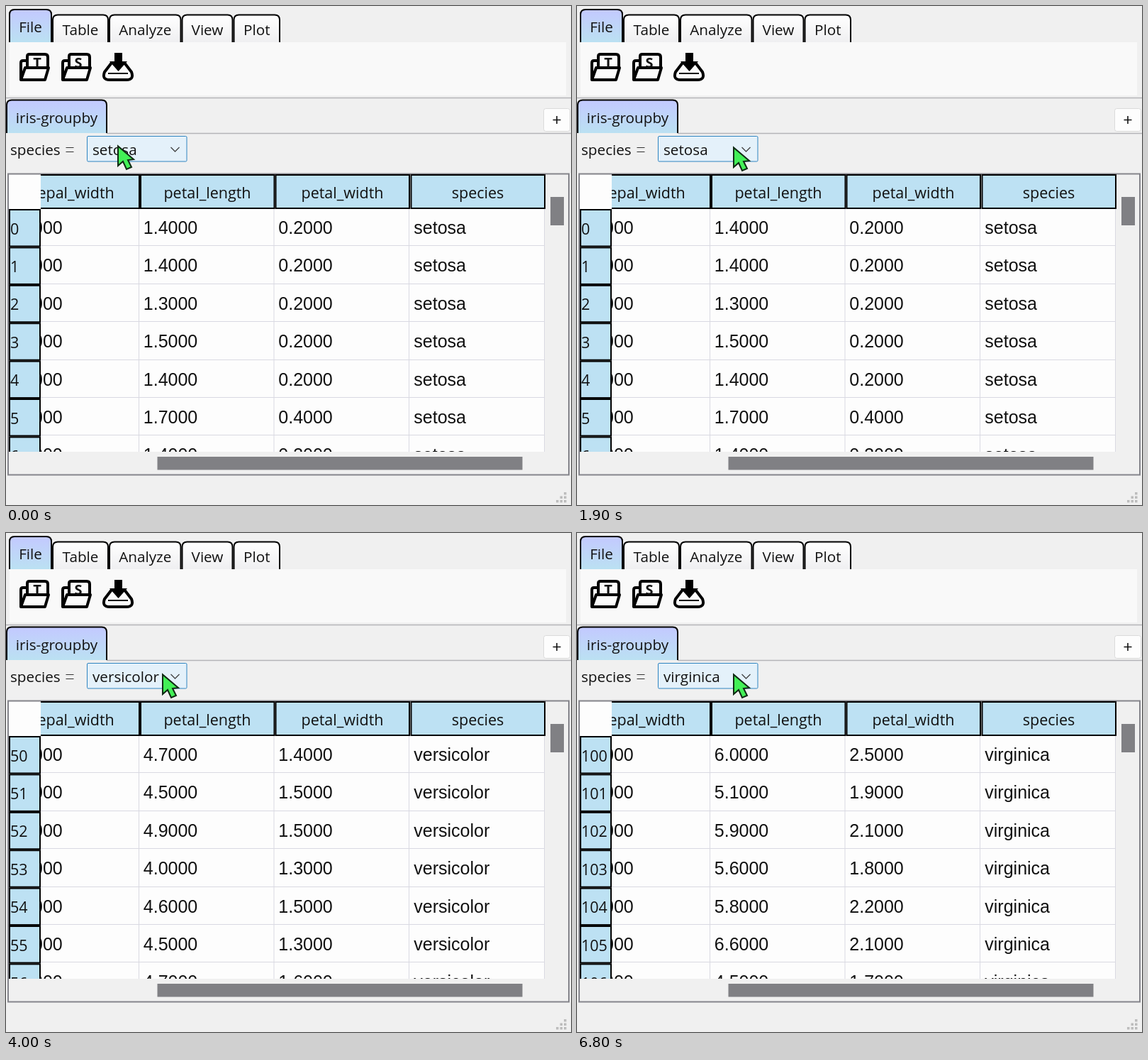
An HTML page that plays this animation: 797x703 px, repeating every 6.9 s.

```html
<!DOCTYPE html>
<html lang="en">
<head>
<meta charset="utf-8">
<title>Group by species</title>
<style>
html, body { margin: 0; width: 100%; height: 100%; overflow: hidden; background: #f0f0f0; }
svg { display: block; }
text { white-space: pre; fill: #111; }
.ui { font: 20.7px "Open Sans", "Noto Sans", sans-serif; }
.head { font-size: 21.5px; }
.cell { font: 25px "Liberation Sans", Arial, sans-serif; }
.mid { text-anchor: middle; }
.tab { stroke: #000; stroke-width: 2; }
.box { fill: #bde1f3; stroke: #000; stroke-width: 2; }
.grid { stroke: #d9d9e2; fill: none; }
.icon { fill: #fcfcfc; stroke: #000; stroke-width: 4; stroke-linejoin: round; stroke-linecap: round; }
#combo { fill: #fdfdfd; stroke: #d2d2d2; }
#combo.hover { fill: #e4f1fa; stroke: #2f84c0; }
</style>
</head>
<body>
<svg class="ui" width="797" height="703" viewBox="0 0 797 703">
  <defs>
    <linearGradient id="active" x2="0" y2="1">
      <stop stop-color="#c3c9ff"/><stop offset="1" stop-color="#bbe1f2"/>
    </linearGradient>
    <linearGradient id="idle" x2="0" y2="1">
      <stop stop-color="#fff"/><stop offset="1" stop-color="#efeff1"/>
    </linearGradient>
    <clipPath id="body"><rect x="49" y="286" width="712" height="342"/></clipPath>
    <clipPath id="side"><rect x="3" y="285" width="47" height="343"/></clipPath>
    <clipPath id="top"><rect x="49" y="236" width="713" height="52"/></clipPath>
    <g id="folder" class="icon">
      <path d="M21 103V80q0-3 3-3h6"/>
      <path d="M30 87V71q0-3 3-3h22q4 0 4 4v15"/>
      <path d="M21 104l6-17h33l-5 17z"/>
    </g>
  </defs>

  <rect width="797" height="703" fill="#f0f0f0"/>
  <rect x="5" y="51" width="785" height="75" fill="#f9f9f9"/>
  <path d="M0 129.5H797M142 179.5H797" stroke="#b4b4b8" stroke-width="1.5"/>
  <g id="tabs"></g>

  <use href="#folder"/>
  <use href="#folder" x="59"/>
  <g class="mid" font-size="20" font-weight="700">
    <text x="44" y="87">T</text><text x="102" y="87">S</text>
  </g>
  <path class="icon" d="M149 80h18l10 13q4 11-7 11h-24q-11 0-7-11z"/>
  <path d="M144 95h28" stroke="#000" stroke-width="2"/>
  <path d="M153 66h11v12h7l-12.500 14-12.500-14h7z"/>

  <rect x="758.500" y="144.500" width="37" height="32" rx="3" fill="#fdfdfd" stroke="#dadada"/>
  <path d="M771.500 160.500h11M777 155v11" stroke="#111" stroke-width="1.600"/>

  <text x="6" y="210">species</text>
  <path d="M84.500 199.500h11M84.500 205.500h11" stroke="#333" stroke-width="1.200"/>
  <rect id="combo" x="114.500" y="183.500" width="140.500" height="35.500" rx="1.500"/>
  <text id="choice" x="122" y="210"></text>
  <path d="M232.500 199l6 6 6-6" fill="none" stroke="#444" stroke-width="1.300"/>

  <rect x="3" y="236.500" width="791" height="424" fill="#f0f0f0" stroke="#85858c" stroke-width="2"/>
  <rect x="4" y="238" width="756" height="390" fill="#fdfdfd"/>
  <g clip-path="url(#body)">
    <path id="lines" class="grid"/>
    <g id="cells" class="cell"></g>
  </g>
  <g id="heads" class="head" clip-path="url(#top)"></g>
  <g id="labels" class="head" clip-path="url(#side)"></g>
  <path d="M768 269h19v40h-19zM213.500 635h515v18.500H213.500z" fill="#808084"/>
  <path id="grip" fill="#bcbcbc"/>
  <path id="cursor" d="M1 2.500L1 30 8 24 13 35 20 32 15 22 23 21z" fill="#43f057" stroke="#102a14" stroke-width="2"/>
</svg>
<script>
const $ = id => document.getElementById(id);
const ROWS = 7, PITCH = 53.4, COLS = [-2, 188.5, 379, 570];
const LOOP = 6900, STEP = 100;

const species = {
  setosa: { first: 0, length: [1.4, 1.4, 1.3, 1.5, 1.4, 1.7, 1.4], width: [.2, .2, .2, .2, .2, .4, .3] },
  versicolor: { first: 50, length: [4.7, 4.5, 4.9, 4, 4.6, 4.5, 4.7], width: [1.4, 1.5, 1.5, 1.3, 1.5, 1.3, 1.6] },
  virginica: { first: 100, length: [6, 5.1, 5.9, 5.6, 5.8, 6.6, 4.5], width: [2.5, 1.9, 2.1, 1.8, 2.2, 2.1, 1.7] }
};
// [start ms, selected species]
const choices = [[0, "setosa"], [2400, "versicolor"], [3100, "virginica"], [3900, "versicolor"],
  [4300, "setosa"], [5000, "versicolor"], [5900, "virginica"]];
// [ms, x, y] of the pointer tip
const path = [[0, 157, 195], [200, 160, 196], [900, 302, 212], [1200, 302, 212], [1700, 220, 197], [LOOP, 220, 197]];

const text = (x, y, s, cls = "") => `<text x="${x}" y="${y}" class="${cls}">${s}</text>`;
const box = (x, y, w, h) => `<rect class="box" x="${x}" y="${y}" width="${w}" height="${h}"/>`;

function tab(x, y, w, bottom, name, fill, base) {
  const shape = `M${x} ${bottom}V${y + 7}q0-7 7-7h${w - 14}q7 0 7 7V${bottom}`;
  return `<path class="tab" d="${shape}" fill="url(#${fill})"/>` + text(x + w / 2, base, name, "mid");
}

$("tabs").innerHTML =
  tab(66, 12.5, 78, 51, "Table", "idle", 41) +
  tab(146, 12.5, 100.5, 51, "Analyze", "idle", 41) +
  tab(248.5, 12.5, 71, 51, "View", "idle", 41) +
  tab(321.5, 12.5, 64.5, 51, "Plot", "idle", 41) +
  tab(5, 5, 59, 51, "File", "active", 37) +
  tab(1, 132.5, 141, 179, "iris-groupby", "active", 165);

$("heads").innerHTML = ["sepal_width", "petal_length", "petal_width", "species"]
  .map((name, i) => box(COLS[i] + 1.5, 238, 188.5, 47) + text(COLS[i] + 95.5, 271, name, "mid")).join("");

let lines = COLS.map(x => `M${x + 189.5} 286V628`).join("");
for (let i = 1; i < ROWS; i++) lines += `M49 ${Math.round(285 + i * PITCH) - .5}H760`;
$("lines").setAttribute("d", lines);

let grip = "";
for (let r = 0; r < 3; r++)
  for (let c = 2 - r; c < 3; c++) grip += `M${776 + c * 5.5} ${685 + r * 5.5}h3.500v3.500h-3.500z`;
$("grip").setAttribute("d", grip);

let shown;
function fillTable(name) {
  if (name === shown) return;
  shown = name;
  const { first, length, width } = species[name];
  let cells = "", labels = "";
  for (let i = 0; i < ROWS; i++) {
    const y = 321 + i * PITCH;
    const row = ["3.0000", length[i].toFixed(4), width[i].toFixed(4), name];
    cells += row.map((s, c) => text(COLS[c] + 5.3, y, s)).join("");
    labels += box(5, 287 + i * PITCH, 43, 51.5) + text(6, y + .5, first + i);
  }
  $("cells").innerHTML = cells;
  $("labels").innerHTML = labels;
  $("choice").textContent = name;
}

function pointer(t) {
  const i = path.findIndex(p => p[0] > t);
  const [t0, x0, y0] = path[i - 1], [t1, x1, y1] = path[i];
  const u = (t - t0) / (t1 - t0), e = u * u * (3 - 2 * u);
  return [x0 + (x1 - x0) * e, y0 + (y1 - y0) * e];
}

function draw() {
  const t = Math.floor(performance.now() % LOOP / STEP) * STEP;
  fillTable(choices.filter(c => c[0] <= t).pop()[1]);
  const [x, y] = pointer(t);
  $("cursor").setAttribute("transform", `translate(${Math.round(x)} ${Math.round(y)})`);
  $("combo").classList.toggle("hover", x < 255 && y < 219);
  requestAnimationFrame(draw);
}
draw();
</script>
</body>
</html>
```
